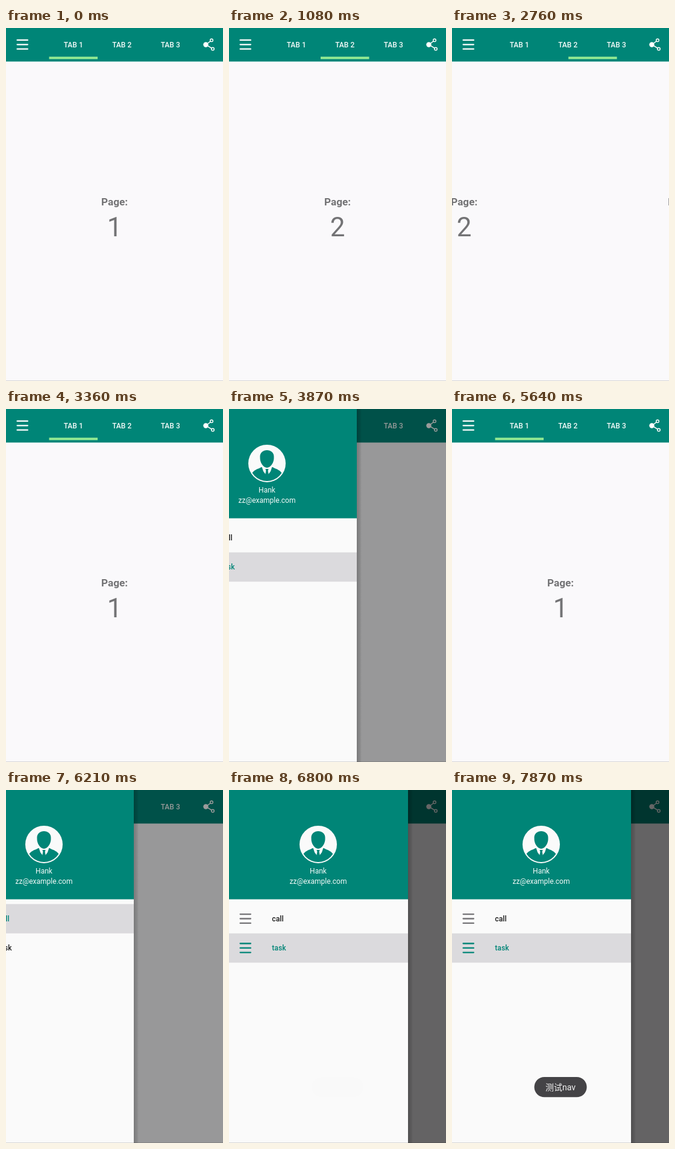
Recreate the animation shown at these times as an HTML page with a canvas. Size 360 px wide and 583 px high, loop 8000 ms.

```html
<!DOCTYPE html>
<html lang="zh">
<head>
<meta charset="utf-8">
<title>Tabs and drawer</title>
<style>
html, body { margin: 0; width: 100%; height: 100%; overflow: hidden; background: #faf9fb; }
canvas { display: block; width: 360px; height: 583px; }
</style>
</head>
<body>
<canvas id="stage"></canvas>
<script>
const W = 360, H = 583, LOOP = 8000;
const GREEN = '#008577', PAPER = '#faf9fb', GRAY = '#737375';
const SANS = 'Roboto, "Noto Sans CJK SC", "Noto Sans CJK", sans-serif';
const DRAWER = 297, TAB_X = 71.5, TAB_W = 80.5;

// [start, end, from page, to page]
const SWIPES = [
  [480, 1070, 0, 1],
  [1960, 2510, 1, 2],
  [2640, 2964, 2, 1],
  [2960, 3360, 1, 0]
];
// [start, drawer opens]
const SLIDES = [[3758, true], [5150.5, false], [6098, true]];
const SLIDE_MS = 512;
const TAB_LAG = 9, SCRIM_LAG = 15;

const canvas = document.getElementById('stage');
const ctx = canvas.getContext('2d');
const ratio = window.devicePixelRatio || 1;
canvas.width = Math.round(W * ratio);
canvas.height = Math.round(H * ratio);

const clamp = v => Math.max(0, Math.min(1, v));
const settle = v => 1 - Math.pow(1 - clamp(v), 5);

// cubic-bezier(.4, 0, .2, 1)
function swipeEase(x) {
  if (x <= 0) return 0;
  if (x >= 1) return 1;
  let lo = 0, hi = 1;
  for (let i = 0; i < 24; i++) {
    const s = (lo + hi) / 2, r = 1 - s;
    if (1.2 * s * r * r + 0.6 * s * s * r + s * s * s < x) lo = s; else hi = s;
  }
  return lo * lo * (3 - 2 * lo);
}

function pageAt(t) {
  let page = 0;
  for (const [start, end, from, to] of SWIPES) {
    if (t >= start) page = from + (to - from) * swipeEase((t - start) / (end - start));
  }
  return page;
}

function openAt(t) {
  let open = 0;
  for (const [start, opens] of SLIDES) {
    if (t < start) continue;
    const k = settle((t - start) / SLIDE_MS);
    open = opens ? k : 1 - k;
  }
  return open;
}

function rect(x, y, w, h, color) {
  ctx.fillStyle = color;
  ctx.fillRect(x, y, w, h);
}

function text(str, x, y, size, color, weight = 400, align = 'center') {
  ctx.font = `${weight} ${size}px ${SANS}`;
  ctx.textAlign = align;
  ctx.fillStyle = color;
  ctx.fillText(str, x, y);
}

function disc(x, y, r, color) {
  ctx.fillStyle = color;
  ctx.beginPath();
  ctx.arc(x, y, r, 0, Math.PI * 2);
  ctx.fill();
}

function poly(points, color) {
  ctx.fillStyle = color;
  ctx.beginPath();
  points.forEach(([x, y]) => ctx.lineTo(x, y));
  ctx.closePath();
  ctx.fill();
}

function line(x1, y1, x2, y2, width, color) {
  ctx.strokeStyle = color;
  ctx.lineWidth = width;
  ctx.lineCap = 'round';
  ctx.beginPath();
  ctx.moveTo(x1, y1);
  ctx.lineTo(x2, y2);
  ctx.stroke();
}

function burger(y, color) {
  for (const dy of [-7.4, 0, 7.4]) line(18.6, y + dy, 35.9, y + dy, 2.3, color);
}

function shareIcon() {
  const ends = [[341, 20.3], [343, 34.4]];
  for (const [x, y] of ends) line(331.5, 27.5, x, y, 1.5, '#fff');
  disc(331.5, 27.5, 4.2, '#fff');
  for (const [x, y] of ends) {
    disc(x, y, 3, '#fff');
    disc(x, y, 1.5, GREEN);
  }
}

function toolbar(page) {
  rect(0, 0, W, 55.4, GREEN);
  burger(27.3, '#fff');
  for (let i = 0; i < 3; i++) {
    text('TAB ' + (i + 1), TAB_X + TAB_W * (i + 0.5), 32, 12, '#f4faf9', 500);
  }
  rect(TAB_X + TAB_W * page, 47.4, TAB_W, 4, '#94ea92');
  shareIcon();
}

function pages(pos) {
  for (let i = 0; i < 3; i++) {
    const x = 180 + (i - pos) * W;
    if (x < -60 || x > W + 60) continue;
    text('Page:', x, 293, 17.1, GRAY, 700);
    text(String(i + 1), x, 344, 44, GRAY);
  }
}

function avatar(x, y) {
  ctx.save();
  ctx.translate(x, y);
  disc(0, 0, 31, '#fafafa');
  ctx.beginPath();
  ctx.arc(0, 0, 29, 0, Math.PI * 2);
  ctx.clip();
  ctx.fillStyle = GREEN;
  ctx.beginPath();
  ctx.moveTo(-29, 31);
  ctx.bezierCurveTo(-27, 11, -19, 11, -9, 6);
  ctx.lineTo(9, 6);
  ctx.bezierCurveTo(19, 11, 27, 11, 29, 31);
  ctx.fill();
  poly([[-9, 4], [9, 4], [6, 13], [0, 21], [-6, 13]], '#fafafa');
  poly([[-2.6, 9], [2.6, 9], [1.6, 12], [2.8, 18], [0, 22], [-2.8, 18], [-1.6, 12]], GREEN);
  ctx.beginPath();
  ctx.moveTo(-11.5, -10);
  ctx.bezierCurveTo(-13, -26, 13, -26, 11.5, -10);
  ctx.bezierCurveTo(12, -2, 6, 7, 0, 7);
  ctx.bezierCurveTo(-6, 7, -12, -2, -11.5, -10);
  ctx.fill();
  ctx.restore();
}

function drawer(open, picked) {
  const edge = Math.round(DRAWER * open);
  if (edge <= 0) return;
  ctx.save();
  ctx.translate(edge - DRAWER, 0);
  const shade = ctx.createLinearGradient(DRAWER, 0, DRAWER + 8, 0);
  shade.addColorStop(0, 'rgba(0,0,0,.2)');
  shade.addColorStop(0.7, 'rgba(0,0,0,.09)');
  shade.addColorStop(1, 'rgba(0,0,0,0)');
  rect(DRAWER, 0, 8, H, shade);
  rect(0, 0, DRAWER, H, '#fafafa');
  rect(0, 0, DRAWER, 180.5, GREEN);
  avatar(148, 89.9);
  text('Hank', 148, 138, 12, '#f4faf9');
  text('zz@example.com', 148, 154.5, 12, '#f4faf9');
  ['call', 'task'].forEach((label, i) => {
    const top = 188.4 + 48.4 * i, on = i === picked;
    if (on) rect(0, top, DRAWER, 48.4, '#dbdadd');
    burger(top + 24.1, on ? GREEN : '#757477');
    text(label, 71.3, top + 28.6, 12.2, on ? GREEN : '#1c1c1c', 500, 'left');
  });
  ctx.restore();
}

function toast(alpha) {
  if (alpha <= 0) return;
  ctx.globalAlpha = alpha;
  ctx.fillStyle = '#444346';
  ctx.beginPath();
  ctx.arc(153.2, 490.6, 16.7, Math.PI / 2, Math.PI * 1.5);
  ctx.arc(206.9, 490.6, 16.7, -Math.PI / 2, Math.PI / 2);
  ctx.fill();
  text('测试nav', 180, 496, 14, '#f3f3f3');
  ctx.globalAlpha = 1;
}

function draw(t) {
  ctx.setTransform(ratio, 0, 0, ratio, 0, 0);
  rect(0, 0, W, H, PAPER);
  pages(pageAt(t));
  toolbar(pageAt(t - TAB_LAG));
  const scrim = 0.6 * openAt(t - SCRIM_LAG);
  if (scrim > 0) rect(0, 0, W, H, `rgba(0,0,0,${scrim})`);
  drawer(openAt(t), t >= 5150 && t < 6795 ? 0 : 1);
  rect(0, 582, W, 1, 'rgba(0,0,0,.14)');
  const fade = clamp((t - 6800) / 400);
  toast(fade * (2 - fade));
}

const begin = performance.now();
function tick() {
  draw((performance.now() - begin) % LOOP);
  requestAnimationFrame(tick);
}
tick();
</script>
</body>
</html>
```
